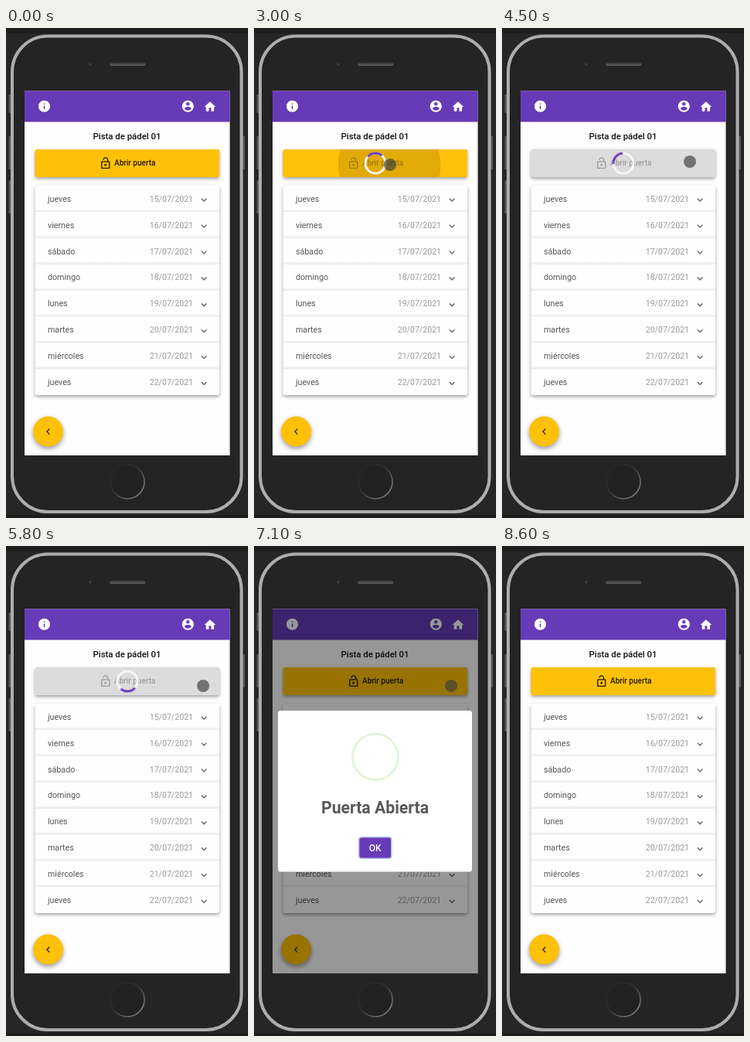
Write an HTML page that moves like this. It is 313 px wide and 634 px high and loops after 8.7 s.

```html
<!DOCTYPE html>
<html lang="es">
<head>
<meta charset="utf-8">
<title>Abrir puerta</title>
<style>
html, body { margin: 0; width: 100%; height: 100%; overflow: hidden; background: #262626; }
svg { display: block; width: 313px; height: 634px; font-family: Roboto, sans-serif; }
.anim { animation: 8.7s linear infinite; }

.title { font-size: 11.4px; font-weight: 500; fill: #111; text-anchor: middle; }
.day { font-size: 10.7px; fill: #555; }
.date { font-size: 10.6px; fill: #999; }
.raised { filter: drop-shadow(0 2px 2px rgba(0, 0, 0, .38)); }

.face { animation-name: face; animation-timing-function: cubic-bezier(.25, .8, .25, 1); }
@keyframes face {
  0%, 34.483% { fill: #ffc107; }
  39.08%, 77.586% { fill: #dcdcdc; }
  82.184%, 100% { fill: #ffc107; }
}

.label { font-size: 10px; font-weight: 500; animation-name: label; animation-timing-function: step-end; }
@keyframes label {
  0%, 77.586%, 100% { opacity: .87; }
  34.483% { opacity: .28; }
}

.ripple { transform-origin: 175px 177px; animation-name: ripple; }
@keyframes ripple {
  0%, 34.482% { opacity: 0; transform: scale(1); }
  34.483% { opacity: .12; transform: scale(1); }
  37.931% { opacity: .12; transform: scale(2.6); }
  41.379%, 100% { opacity: 0; transform: scale(2.6); }
}

.spinner { animation-name: visible; }
@keyframes visible {
  0%, 34.482%, 77.586%, 100% { opacity: 0; }
  34.483%, 77.585% { opacity: 1; }
}
/* one turn each 800 ms, in 45 degree steps */
.arc { transform-origin: 157px 175px; animation-name: spin; }
@keyframes spin {
  0%, 34.483% { transform: rotate(-4deg); animation-timing-function: steps(38); }
  78.161%, 100% { transform: rotate(1706deg); }
}

.dim { animation-name: dim; animation-timing-function: ease; }
@keyframes dim {
  0%, 77.586% { opacity: 0; }
  78.736%, 95.977% { opacity: .4; }
  97.701%, 100% { opacity: 0; }
}

.popup { transform-origin: 156.5px 317.5px; animation-name: popup; animation-timing-function: ease; }
@keyframes popup {
  0%, 77.585% { opacity: 0; transform: scale(.7); }
  77.586% { opacity: 1; transform: scale(.7); }
  79.138% { transform: scale(1.05); }
  80.345% { transform: scale(.95); }
  81.034%, 95.977% { opacity: 1; transform: scale(1); }
  97.701%, 100% { opacity: 0; transform: scale(.5); }
}

.check { stroke-dasharray: 1 2; animation-name: check; }
@keyframes check {
  0%, 82.241% { stroke-dashoffset: 1.1; }
  84.828%, 100% { stroke-dashoffset: 0; }
}

.pointer { animation-name: move, show; animation-timing-function: ease-in-out, step-end; }
@keyframes move {
  0%, 17.241% { transform: translate(224px, 145px); }
  19.54%, 21.839% { transform: translate(217px, 146px); }
  28.736% { transform: translate(172px, 177px); }
  31.034%, 37.931% { transform: translate(176px, 177px); }
  47.126%, 55.172% { transform: translate(243px, 173px); }
  62.069%, 100% { transform: translate(255px, 181px); }
}
@keyframes show {
  0%, 86.207%, 100% { opacity: 0; }
  17.241% { opacity: 1; }
}
</style>
</head>
<body>
<svg viewBox="0 0 313 634">
  <defs>
    <linearGradient id="homeRing" x1="0" y1="0" x2="1" y2="1">
      <stop offset="0" stop-color="#222"/>
      <stop offset=".45" stop-color="#333"/>
      <stop offset="1" stop-color="#999"/>
    </linearGradient>
    <linearGradient id="speaker" x1="0" y1="0" x2="0" y2="1">
      <stop offset="0" stop-color="#333"/>
      <stop offset="1" stop-color="#606060"/>
    </linearGradient>
    <linearGradient id="rowEdge" x1="0" y1="0" x2="0" y2="1">
      <stop offset="0" stop-color="#000" stop-opacity="0"/>
      <stop offset="1" stop-color="#000" stop-opacity=".09"/>
    </linearGradient>
    <clipPath id="buttonClip"><rect x="37.5" y="157" width="238.5" height="36" rx="3"/></clipPath>
  </defs>

  <rect width="313" height="634" fill="#262626"/>
  <rect width="313" height="7" fill="#1e1e1e"/>
  <rect y="630" width="313" height="4" fill="#201b1d"/>

  <g fill="#555">
    <rect x="3.5" y="86" width="4" height="24" rx="1"/>
    <rect x="3.5" y="140" width="4" height="43" rx="1"/>
    <rect x="3.5" y="197" width="4" height="43" rx="1"/>
    <rect x="305" y="140" width="4" height="43" rx="1"/>
  </g>
  <rect x="8" y="10.5" width="296.5" height="615.5" rx="46" fill="#242424" stroke="#adadad" stroke-width="4"/>
  <circle cx="109" cy="47" r="1.8" fill="#3c3c3c"/>
  <rect x="134" y="44.5" width="46.500" height="4.500" rx="2.2" fill="url(#speaker)"/>
  <circle cx="157" cy="587" r="22" fill="#222" stroke="url(#homeRing)" stroke-width="1.600"/>

  <rect x="24" y="81.500" width="265.500" height="471.500" fill="#fefefe"/>
  <rect x="24" y="81.500" width="265.500" height="40" fill="#673ab7"/>
  <g fill="#fff">
    <path transform="translate(40.500 92.300) scale(.75)" d="M12 2C6.480 2 2 6.480 2 12s4.480 10 10 10 10-4.480 10-10S17.520 2 12 2zm1 15h-2v-6h2v6zm0-8h-2V7h2v2z"/>
    <path transform="translate(226.300 92.300) scale(.75)" d="M12 2C6.480 2 2 6.480 2 12s4.480 10 10 10 10-4.480 10-10S17.520 2 12 2zm0 3c1.660 0 3 1.340 3 3s-1.340 3-3 3-3-1.340-3-3 1.340-3 3-3zm0 14.200c-2.500 0-4.710-1.280-6-3.220.030-1.990 4-3.080 6-3.080 1.990 0 5.970 1.090 6 3.080-1.290 1.940-3.500 3.220-6 3.220z"/>
    <path transform="translate(255 93) scale(.74)" d="M10 20v-6h4v6h5v-8h3L12 3 2 12h3v8z"/>
  </g>
  <text class="title" x="156.500" y="143.500">Pista de pádel 01</text>

  <g class="raised">
    <rect class="anim face" x="37.500" y="157" width="238.500" height="36" rx="3" fill="#ffc107"/>
  </g>
  <g clip-path="url(#buttonClip)"><circle class="anim ripple" cx="175" cy="177" r="66"/></g>
  <g class="anim label">
    <path transform="translate(120.200 166.500) scale(.71)" d="M12 17c1.100 0 2-.9 2-2s-.9-2-2-2-2 .9-2 2 .9 2 2 2zm6-9h-1V6c0-2.760-2.240-5-5-5S7 3.240 7 6h1.900c0-1.710 1.390-3.100 3.100-3.100 1.710 0 3.100 1.390 3.100 3.100v2H6c-1.100 0-2 .9-2 2v10c0 1.100.9 2 2 2h12c1.100 0 2-.9 2-2V10c0-1.100-.9-2-2-2zm0 12H6V10h12v10z"/>
    <text x="140" y="178.300">Abrir puerta</text>
  </g>
  <g class="anim spinner" fill="none" stroke-width="3">
    <circle cx="157" cy="175" r="13" stroke="#f6f6f6"/>
    <path class="anim arc" d="M147.800 165.800A13 13 0 0 1 166.200 165.800" stroke="#673ab7"/>
  </g>

  <rect class="raised" x="37.500" y="204" width="238.500" height="271" rx="3" fill="#fefefe"/>
  <g id="rows"></g>

  <circle cx="54.500" cy="522" r="19.500" fill="#ffc107" style="filter: drop-shadow(0 3px 3px rgba(0, 0, 0, .4))"/>
  <path d="M56.200 518.800l-3.300 3.400 3.300 3.400" fill="none" stroke="#222" stroke-width="1.300"/>

  <rect class="anim dim" x="24" y="81.500" width="265.500" height="471.500"/>

  <g class="anim pointer"><circle r="8" fill="#404040" fill-opacity=".68"/></g>

  <g class="anim popup">
    <rect x="31" y="213" width="251" height="208.500" rx="3.500" fill="#fff"/>
    <circle cx="157" cy="272.800" r="29.600" fill="none" stroke="#a5dc86" stroke-opacity=".32" stroke-width="2.800"/>
    <path class="anim check" pathLength="1" d="M140.600 273L152.200 285L174.700 261.700" fill="none" stroke="#a5dc86" stroke-width="3.500" stroke-linecap="round"/>
    <text x="156.500" y="345.500" font-size="21.200" font-weight="600" fill="#595959" text-anchor="middle">Puerta Abierta</text>
    <rect x="135" y="376" width="43.500" height="29" rx="4" fill="#b5bfe6"/>
    <rect x="136.500" y="377.500" width="40.500" height="26" rx="2.800" fill="#673ab7"/>
    <text x="156.700" y="394.600" font-size="12" font-weight="500" fill="#fff" text-anchor="middle">OK</text>
  </g>
</svg>
<script>
const days = ['jueves', 'viernes', 'sábado', 'domingo', 'lunes', 'martes', 'miércoles', 'jueves'];
const pitch = 33.9;

document.getElementById('rows').innerHTML = days.map((day, i) => {
  const y = 204 + i * pitch;
  const edge = i < days.length - 1
    ? `<rect x="37.5" y="${y + pitch - 4}" width="238.5" height="4" fill="url(#rowEdge)"/>`
    : '';
  return `${edge}
    <text class="day" x="54" y="${y + 20.7}">${day}</text>
    <text class="date" x="185.700" y="${y + 20.7}">${15 + i}/07/2021</text>
    <path d="M252.700 ${y + 16.8}l3.300 3.300 3.300-3.300" fill="none" stroke="#666" stroke-width="1.400"/>`;
}).join('');
</script>
</body>
</html>
```
